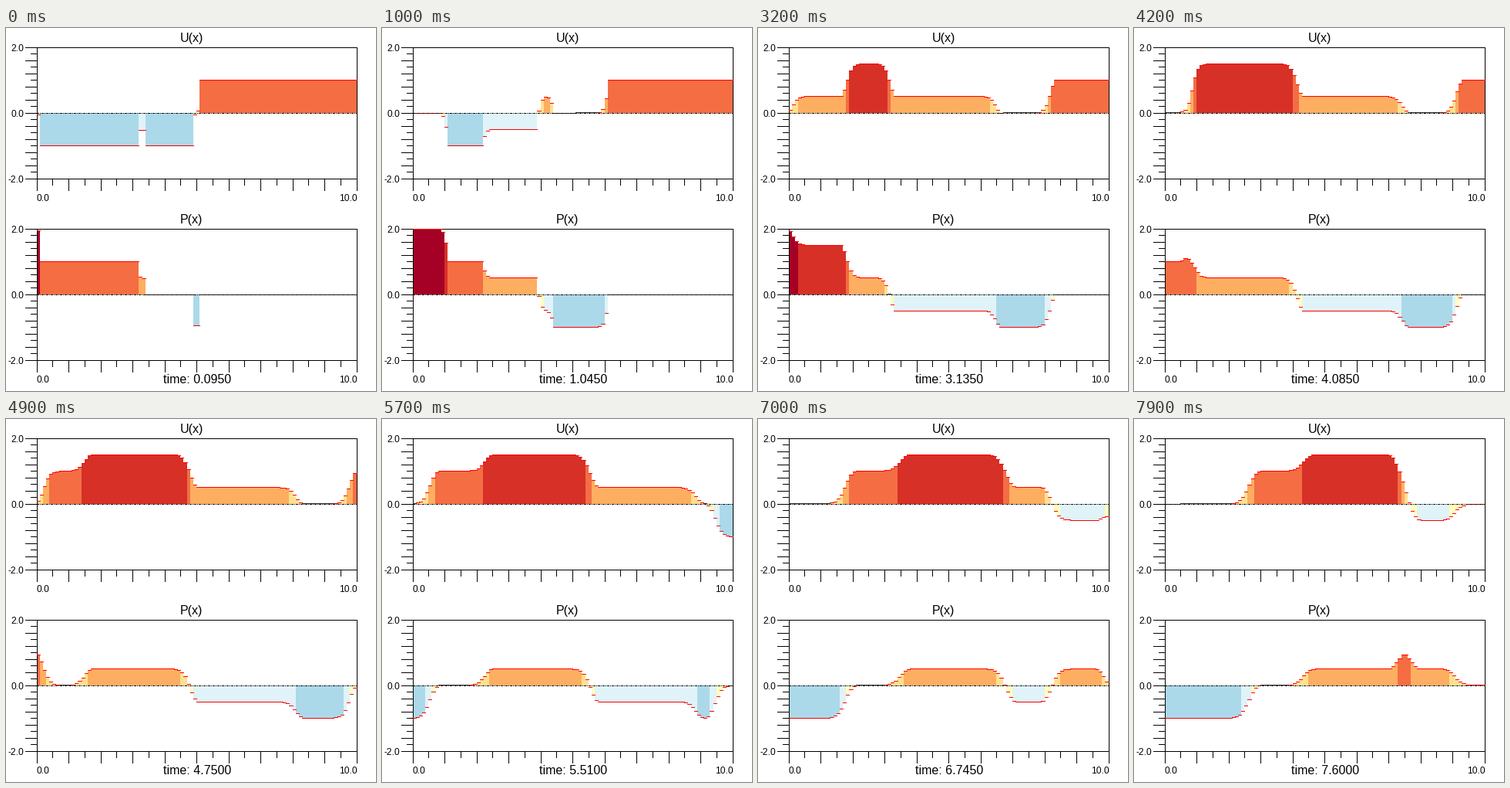
Recreate the animation shown at these times as a matplotlib script. Size 480 px wide and 470 px high, loop 8000 ms.

```python
import numpy as np
import matplotlib.pyplot as plt
from matplotlib.animation import FuncAnimation
from matplotlib.colors import to_rgb

W, H, DPI = 480, 470, 100
LEFT, RIGHT = 40, 455
HALF = 85            # pixels from the zero line to +-2
ZERO_U, ZERO_P = 110, 345
CELLS, FRAMES = 100, 80
DT, CFL = 0.095, 0.95

PALETTE = ["#313695", "#4575b4", "#74add1", "#abd9e9", "#e0f3f8", "#ffffbf",
           "#fee090", "#fdae61", "#f46d43", "#d73027", "#a50026"]
rgb = lambda c: np.round(np.array(to_rgb(c)) * 255).astype(np.uint8)
COLORS = [rgb(c) for c in PALETTE]
RED, DARK = rgb("#ff0000"), rgb("#403030")
EDGES = (LEFT + (RIGHT - LEFT) / CELLS * np.arange(CELLS + 1)).astype(int)


def step(u, p):
    """Godunov step for acoustics: wall on the left, zero pressure on the right."""
    ue = np.concatenate(([-u[0]], u, [u[-1]]))
    pe = np.concatenate(([p[0]], p, [-p[-1]]))
    us = (ue[:-1] + ue[1:] + pe[:-1] - pe[1:]) / 2
    ps = (pe[:-1] + pe[1:] + ue[:-1] - ue[1:]) / 2
    return u - CFL * np.diff(ps), p - CFL * np.diff(us)


def solve():
    i = np.arange(CELLS)
    u, p = np.where(i < 50, -1.0, 1.0), np.where(i < 33, 1.0, 0.0)
    states = []
    for _ in range(FRAMES):
        u, p = step(u, p)
        states.append((u, p))
    return states


def draw_frame(img, zero):
    top, bottom = zero - HALF, zero + HALF
    img[[top, bottom], LEFT:RIGHT + 1] = 0
    img[top:bottom + 1, [LEFT, RIGHT]] = 0
    for k in range(21):
        size = 8 if k % 2 else 15
        x = int(LEFT + k * (RIGHT - LEFT) / 20)
        y = int(top + k * HALF / 10)
        img[bottom:bottom + size + 1, x] = 0
        img[y, LEFT - size:LEFT] = 0


def draw_field(img, zero, v, other):
    ys = np.floor(zero - HALF / 2 * np.round(v, 13)).astype(int)
    ys = np.clip(ys, zero - HALF, zero + HALF)
    bins = np.clip(np.ceil(2.5 * np.round(v, 9) + 5), 0, 10).astype(int)
    for a, b, y, k in zip(EDGES, EDGES[1:], ys, bins):
        lo, hi = min(y, zero), max(y, zero)
        img[lo:hi, a:b] = COLORS[k]
    img[zero - HALF:zero + HALF + 1, LEFT] = 0
    flat = (np.abs(v) < 0.01) & (np.abs(np.abs(other) - 1) < 0.05)
    for a, b, y, dark in zip(EDGES, EDGES[1:], ys, flat):
        img[y, a:b + 1] = DARK if dark else RED
    x = np.arange(LEFT, RIGHT + 1)
    img[zero, x[np.isin((x - LEFT) % 6, (0, 1, 2, 4))]] = 0


STATES = solve()
base = np.full((H, W, 3), 255, np.uint8)
for z in (ZERO_U, ZERO_P):
    draw_frame(base, z)

plt.rcParams["font.family"] = "Liberation Sans"
fig = plt.figure(figsize=(W / DPI, H / DPI), dpi=DPI, facecolor="white")
ax = fig.add_axes([0, 0, 1, 1])
ax.axis("off")
canvas = ax.imshow(base, extent=(0, W, H, 0), interpolation="nearest",
                   aspect="auto")
ax.set_xlim(0, W)
ax.set_ylim(H, 0)


def label(x, y, s, px, ha):
    return ax.text(x, y, s, fontsize=px * 72 / DPI, ha=ha, va="baseline",
                   color="black")


for zero, title in ((ZERO_U, "U(x)"), (ZERO_P, "P(x)")):
    label(240.5, zero - 92, title, 16, "center")
    for k, s in enumerate(("2.0", "0.0", "-2.0")):
        label(23, zero + 5 + (k - 1) * HALF, s, 12, "right")
    label(40, zero + 114, "0.0", 12, "left")
    label(455.5, zero + 114, "10.0", 12, "right")
clock = label(203.5, 460, "", 16, "left")


def update(n):
    u, p = STATES[n]
    img = base.copy()
    draw_field(img, ZERO_U, u, p)
    draw_field(img, ZERO_P, p, u)
    canvas.set_data(img)
    clock.set_text(f"time: {DT * (n + 1):.4f}")
    return canvas, clock


anim = FuncAnimation(fig, update, frames=FRAMES, interval=100, repeat=True,
                     repeat_delay=0, blit=False)
plt.show()
```
